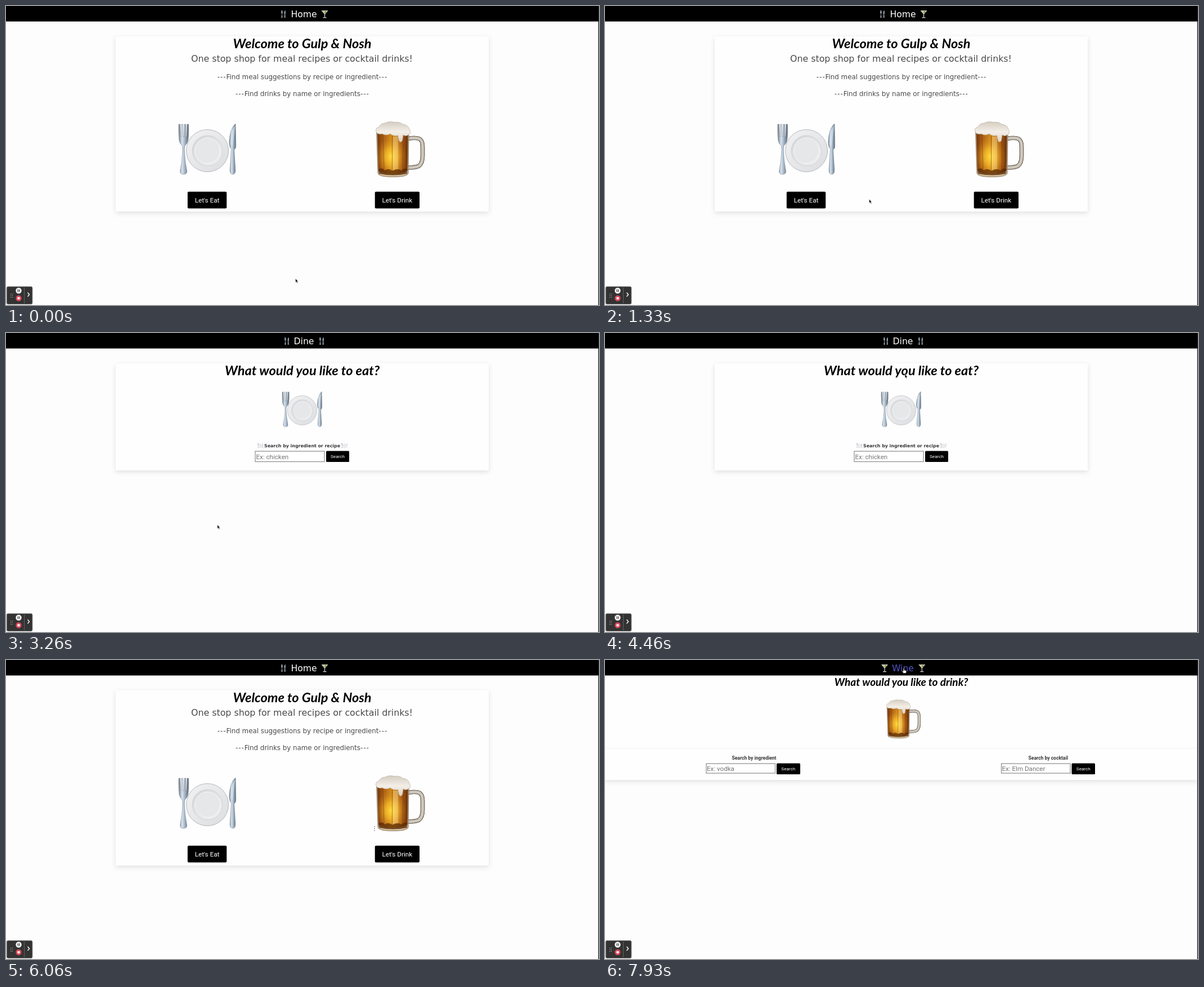
Recreate the animation shown at these times as an HTML page. Size 1054x531 px, loop 8000 ms.

```html
<!DOCTYPE html>
<html lang="en">
<head>
<meta charset="utf-8">
<title>Recipe and cocktail finder</title>
<style>
  html, body { margin: 0; width: 100%; height: 100%; overflow: hidden; background: #fdfdfd; }
  svg { display: block; width: 1054px; height: 531px; }
  text { font-family: Roboto, sans-serif; }
  .nav, .copy { font-family: "DejaVu Sans", sans-serif; fill: #4a4a4a; }
  .nav { font-size: 15.6px; fill: #fff; }
  .nav.over { fill: #5353c6; }
  .mid { text-anchor: middle; }
  .dash { letter-spacing: 1px; }
  .title { font: italic 700 23.5px Lato, sans-serif; fill: #000; text-anchor: middle; }
  .card { fill: #fefefe; filter: drop-shadow(0 3px 4px rgba(0,0,0,.11)); }
  .btn text { fill: #fff; font-size: 11.7px; text-anchor: middle; }
  .btn.small text { font-size: 8.1px; }
  .btn.over rect { fill: #f5d76e; }
  .btn.over text { fill: #4a4a4a; }
  .field rect { fill: #fff; stroke: #8b8b8b; stroke-width: 1.2; }
  .field text { fill: #757575; font-size: 11.6px; }
  .label { font-size: 8.55px; font-weight: 700; fill: #363636; text-anchor: middle; }
</style>
</head>
<body>
<svg viewBox="0 0 1054 531">
  <defs>
    <linearGradient id="steel">
      <stop offset="0" stop-color="#707c89"/><stop offset=".35" stop-color="#d8e4ef"/>
      <stop offset=".65" stop-color="#9badbf"/><stop offset="1" stop-color="#5f6873"/>
    </linearGradient>
    <linearGradient id="rim" x2="1" y2="1">
      <stop offset="0" stop-color="#f2f2f3"/><stop offset="1" stop-color="#dcdde0"/>
    </linearGradient>
    <linearGradient id="well" x2="1" y2="1">
      <stop offset="0" stop-color="#d3d5d8"/><stop offset="1" stop-color="#f1f1f2"/>
    </linearGradient>
    <linearGradient id="beer">
      <stop offset="0" stop-color="#713408"/><stop offset=".18" stop-color="#a85a14"/>
      <stop offset=".45" stop-color="#d28a1c"/><stop offset=".62" stop-color="#c98426"/>
      <stop offset=".82" stop-color="#a45612"/><stop offset="1" stop-color="#66300a"/>
    </linearGradient>
    <radialGradient id="glow" cx=".45" cy=".6" r=".5">
      <stop offset="0" stop-color="#ffdc3c"/><stop offset=".4" stop-color="#f8bd2a" stop-opacity=".75"/>
      <stop offset="1" stop-color="#c47a1c" stop-opacity="0"/>
    </radialGradient>
    <linearGradient id="foam" x2="0" y2="1">
      <stop offset="0" stop-color="#d5cdc2"/><stop offset=".5" stop-color="#f3eee7"/>
      <stop offset="1" stop-color="#dfd2c0"/>
    </linearGradient>

    <!-- cutlery and mug share one scale: about 100 units wide -->
    <path id="fork" d="M0 1H2.600L3.700 23H5L4.800 1H7.400L8 23H9.400L10 1H12.600L12.400 23H13.700L14.900 1H17.500
      Q18 22 16.500 30Q15 36 11 39Q10 42 10.300 50Q11 66 14.500 84Q15 90 8.500 90Q2.200 90 2.500 84
      Q6.200 66 6.900 50Q7.200 42 6.300 39Q2 36 .9 30Q-.3 20 0 1Z" fill="url(#steel)" stroke="#6c7681" stroke-width=".5"/>
    <g id="knife">
      <path d="M12 0Q2 8 .8 32Q.6 42 4.500 45Q4 52 2 82Q1.600 90 7 90Q12 90 11.800 82L9.600 46Q12.500 45 12.700 40Z"
        fill="url(#steel)" stroke="#76818c" stroke-width=".5"/>
      <path d="M11.500 3Q4 12 2.500 36L7 40Z" fill="#d5e5f1" opacity=".6"/>
    </g>
    <g id="plate">
      <circle cx="51" cy="48" r="37.500" fill="url(#rim)" stroke="#b4b6bb"/>
      <circle cx="51" cy="48" r="27" fill="url(#well)" stroke="#c9cacd" stroke-width=".7"/>
      <circle cx="51" cy="48" r="22.500" fill="#e6e7e9" stroke="#f8f8f8"/>
      <use href="#fork"/>
      <use href="#knife" x="89"/>
    </g>
    <g id="mug">
      <g fill="none">
        <path id="grip" d="M57 30.500Q72 28 78 31Q83.500 34 83.500 45V61Q83.500 74 77 79Q72 82 57 82" stroke="#7f776c" stroke-width="7.500"/>
        <use href="#grip"/>
        <path d="M57 30.500Q72 28 78 31Q83.500 34 83.500 45V61Q83.500 74 77 79Q72 82 57 82" stroke="#cfc8bd" stroke-width="4.800"/>
      </g>
      <path d="M1.500 16H59L58 92Q57 98.500 31 98.500Q5 98.500 4 92Z" fill="#b8a284" stroke="#7c6a52" stroke-width=".8"/>
      <path id="ale" d="M3 17H57.500L56.500 87Q50 93 31 93Q11 93 5 87Z" fill="url(#beer)"/>
      <path d="M3 17H57.500L56.500 87Q50 93 31 93Q11 93 5 87Z" fill="url(#glow)"/>
      <path d="M31 27H40V86H30Z" fill="#ffe7a8" opacity=".35"/>
      <path d="M13 24L15 88M29.500 25V90M49 26L48 88" stroke="#6a3509" stroke-opacity=".5" fill="none"/>
      <path d="M5 86Q11 80 16 87Q23 82 30 88Q38 82 46 87Q52 81 56.500 85L55 93Q31 98 6.500 93Z" fill="#552707" opacity=".7"/>
      <path d="M8 94.500Q31 99 54 94.500" stroke="#e4cfa4" stroke-width="1.600" fill="none"/>
      <path d="M.5 17Q0 11 6 10Q9 3 17 3Q24-1 33 1.500Q42 0 48 5Q58 6 60 14Q64 21 58 24Q53 27 49 24L47.500 34Q44 39 41.500 34L39.500 25
        Q32 27 26 22Q18 26 12 22Q2 24 .5 17Z" fill="url(#foam)" stroke="#b9ad9b" stroke-width=".7"/>
    </g>
    <g id="cutlery">
      <use href="#fork" transform="scale(.17 .15)"/>
      <use href="#knife" transform="translate(5.500) scale(.18 .15)"/>
    </g>
    <g id="glass">
      <path d="M0 0H12L6.600 6.500V12H9V13.300H3V12H5.400V6.500Z" fill="#d8d8ce"/>
      <path d="M2 1.500H10L6 6Z" fill="#b9bd76"/>
      <circle cx="7.500" cy="2.500" r="1.200" fill="#61772b"/>
    </g>
  </defs>

  <rect width="1054" height="531" fill="#fdfdfd"/>

  <g id="home">
    <rect class="card" x="195" y="54" width="663" height="311"/>
    <text class="title" x="526.500" y="74.500">Welcome to Gulp &amp; Nosh</text>
    <text class="copy mid" x="526" y="99.300" font-size="15.8">One stop shop for meal recipes or cocktail drinks!</text>
    <text class="copy mid" x="527" y="130" font-size="11.85"><tspan class="dash">---</tspan>Find meal suggestions by recipe or ingredient<tspan class="dash">---</tspan></text>
    <text class="copy mid" x="526.800" y="159.700" font-size="11.85"><tspan class="dash">---</tspan>Find drinks by name or ingredients<tspan class="dash">---</tspan></text>
    <use href="#plate" x="307" y="209"/>
    <use href="#mug" x="657" y="205"/>
    <g class="btn" id="eat"><rect x="322.800" y="329.700" width="69.400" height="29.800" rx="2"/><text x="357.500" y="349.300">Let's Eat</text></g>
    <g class="btn" id="drink"><rect x="655.700" y="329.700" width="79.300" height="29.800" rx="2"/><text x="695.300" y="349.300">Let's Drink</text></g>
  </g>

  <g id="dine">
    <rect class="card" x="195" y="54" width="663" height="190"/>
    <text class="title" x="526.500" y="74.500">What would you like to eat?</text>
    <use href="#plate" transform="translate(491 104) scale(.695)"/>
    <text class="copy mid" x="526.500" y="202.800" font-size="7.86" font-weight="700" style="fill:#363636">Search by ingredient or recipe</text>
    <use href="#plate" transform="translate(447 195.500) scale(.098)" opacity=".8"/>
    <use href="#plate" transform="translate(596.300 195.500) scale(.098)" opacity=".8"/>
    <g class="field"><rect x="443" y="210" width="123" height="18.500"/><text x="444.500" y="223.800">Ex: chicken</text></g>
    <g class="btn small"><rect x="569" y="209.500" width="41" height="19.500" rx="1.500"/><text x="589.500" y="222.400">Search</text></g>
  </g>

  <g id="wine">
    <rect class="card" y="27" width="1053" height="186"/>
    <rect y="156.500" width="1053" height="1" fill="#f5f5f5"/>
    <text class="title" x="526.500" y="45.500" style="font-size:19px">What would you like to drink?</text>
    <use href="#mug" transform="translate(500 70) scale(.7)"/>
    <text class="label" x="265" y="176.600">Search by ingredient</text>
    <g class="field"><rect x="180" y="184" width="122.500" height="17"/><text x="181" y="196.800">Ex: vodka</text></g>
    <g class="btn small"><rect x="305" y="183.500" width="42" height="19.500" rx="1.500"/><text x="325.800" y="196.400">Search</text></g>
    <text class="label" x="787.800" y="176.600">Search by cocktail</text>
    <g class="field"><rect x="704.500" y="184" width="122.500" height="17"/><text x="705.500" y="196.800">Ex: Elm Dancer</text></g>
    <g class="btn small"><rect x="829.500" y="183.500" width="41.500" height="19.500" rx="1.500"/><text x="850.300" y="196.400">Search</text></g>
  </g>

  <rect width="1054" height="27.500"/>
  <rect x="1052.700" width="1.300" height="531" fill="#222"/>
  <text class="nav mid" id="nav" x="529.500" y="20"></text>
  <g id="homeIcons"><use href="#cutlery" x="489" y="7.500"/><use href="#glass" x="560.500" y="8"/></g>
  <g id="dineIcons"><use href="#cutlery" x="495" y="7.500"/><use href="#cutlery" x="557" y="7.500"/></g>
  <g id="wineIcons"><use href="#glass" x="491" y="8"/><use href="#glass" x="557.300" y="8"/></g>

  <g id="recorder">
    <rect x="1.300" y="498.300" width="45.600" height="31.200" rx="2.500" fill="#333" stroke="#777" stroke-width=".8"/>
    <path d="M8 511.500h4M8 514.500h4M8 517.500h4" stroke="#bbb" stroke-width="1.200" stroke-dasharray="1.200 1.600"/>
    <circle cx="22.500" cy="505.500" r="5.200" fill="#f4f4f4"/>
    <path d="M21.200 503.200v4.600M23.800 503.200v4.600" stroke="#333" stroke-width="1.200"/>
    <circle cx="22.500" cy="519" r="5.200" fill="#d9495a"/>
    <rect x="20.500" y="517" width="4" height="4" fill="#fff"/>
    <path d="M32.500 500v28" stroke="#626262"/>
    <path d="M38.500 509l3 3.500l-3 3.500" fill="none" stroke="#fff" stroke-width="1.400"/>
  </g>

  <g id="pointer">
    <circle id="ring" cx="1" cy="1" r="16.300" fill="#eec07a" fill-opacity=".3" stroke="#c9605a" stroke-width="1.200"/>
    <path id="arrow" d="M0 0V7L1.600 5.600L2.800 8.200L4 7.600L2.900 5.200H4.800Z" fill="#111" stroke="#fff" stroke-width=".5"/>
    <path id="hand" d="M-.9 0Q0-1 .9 0V3L4 3.800Q5 4.200 4.700 6L4 8.500H-.5L-3 5Q-2.800 3.500-.9 5Z" fill="#fff" stroke="#222" stroke-width=".8"/>
    <path id="beam" d="M-1.500-4H1.500M0-4V5M-1.500 5H1.500" fill="none" stroke="#333" stroke-width=".9"/>
    <path id="dots" d="M0-4V5" stroke="#777" stroke-width="1.500" stroke-dasharray="1.500 2"/>
  </g>
</svg>
<script>
const $ = id => document.getElementById(id);
const show = (id, on) => $(id).style.display = on ? "" : "none";
const between = (v, a, b) => v >= a && v < b;

const LOOP = 8000, STEP = 200 / 3;

// pointer tip: time, x, y
const path = [
  [0, 514.5, 484], [60, 514.5, 484], [1330, 469.5, 343], [1730, 402, 344], [1930, 402, 344],
  [2260, 373, 343], [3200, 373, 343], [4000, 510, 217], [4200, 510, 217], [4460, 533, 73],
  [4660, 532, 34], [4870, 532, 34], [5130, 531, 15], [5540, 531, 15], [5730, 590, 205],
  [5870, 590, 205], [6060, 655, 299], [6200, 655, 299], [6440, 695, 343], [6740, 695, 343],
  [7130, 647, 190], [7340, 647, 190], [7530, 560, 62], [7670, 560, 62], [7920, 531, 15], [LOOP, 531, 15]
];

function pointerAt(t) {
  const i = path.findIndex(k => k[0] > t);
  const [t0, x0, y0] = path[i - 1], [t1, x1, y1] = path[i];
  const u = (t - t0) / (t1 - t0), e = u * u * (3 - 2 * u);
  return [x0 + (x1 - x0) * e, y0 + (y1 - y0) * e];
}

function draw(now) {
  const t = Math.floor((now % LOOP + 7) / STEP) * STEP % LOOP;
  const page = t < 2590 ? "home" : t < 5320 ? "dine" : t < 6590 ? "home" : "wine";
  const [x, y] = pointerAt(t);

  for (const p of ["home", "dine", "wine"]) {
    show(p, p === page);
    show(p + "Icons", p === page);
  }
  $("nav").textContent = page[0].toUpperCase() + page.slice(1);

  const onNav = between(x, 505, 555) && y < 27;
  const onButton = page === "home" && between(y, 330, 360);
  const onEat = onButton && between(x, 323, 392);
  const onDrink = onButton && between(x, 656, 735);
  $("nav").classList.toggle("over", onNav);
  $("eat").classList.toggle("over", onEat);
  $("drink").classList.toggle("over", onDrink);

  const stale = between(t, 2590, 3260) || between(t, 6590, 6780);
  const shape = onNav || onEat || onDrink || stale ? "hand"
    : page === "dine" && between(x, 443, 566) && between(y, 210, 229) ? "beam"
    : between(t, 6050, 6250) ? "dots" : "arrow";
  for (const s of ["arrow", "hand", "beam", "dots"]) show(s, s === shape);
  show("ring", between(t, 2390, 2590) || between(t, 5190, 5320) || between(t, 6460, 6590));
  $("pointer").setAttribute("transform", `translate(${x} ${y})`);
}

const start = performance.now();
function tick() {
  draw(performance.now() - start);
  requestAnimationFrame(tick);
}
tick();
</script>
</body>
</html>
```
